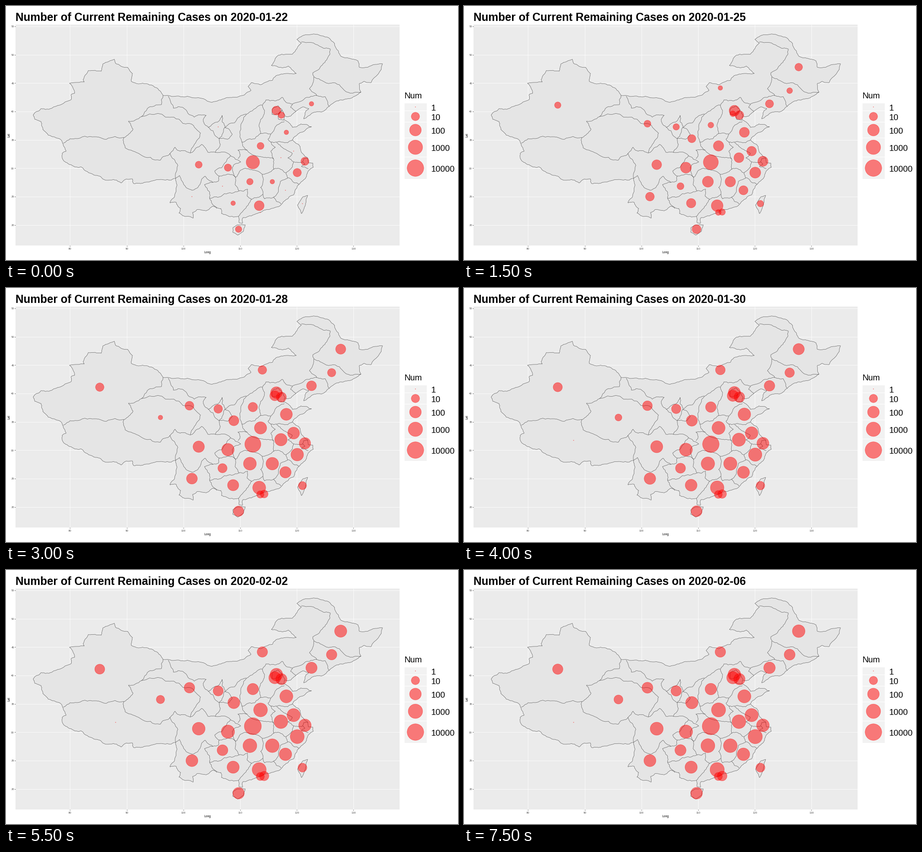
A matplotlib script that plays this animation: 998 px wide and 561 px high, repeating every 8 s.

```python
import numpy as np
import matplotlib.pyplot as plt
from matplotlib.animation import FuncAnimation
from matplotlib.patches import Rectangle

W, H, DPI = 998, 561, 72
DAYS, STEP = 16, 500
plt.rcParams["font.family"] = "Liberation Sans"
rng = np.random.default_rng(7)

# Key points (longitude, latitude) of the outer boundary, clockwise from the west.
NORTH = [
    (73.5, 39.4), (73.8, 39.8), (74.9, 40.5), (76.3, 40.4), (78.1, 41.1),
    (80.2, 42.1), (80.2, 43), (80.8, 43.2), (80.4, 44.4), (79.9, 45), (82.5, 45.2),
    (82.3, 45.6), (83.2, 47.2), (85.5, 47.1), (85.8, 48.4), (87.8, 49.2),
    (88, 48.5), (90.1, 47.8), (91, 46.7), (90.8, 45.3), (93.5, 44.9), (95.4, 44.1),
    (96.4, 42.8), (99.5, 42.6), (101.8, 42.4), (105, 41.6), (107.5, 42.4),
    (109.4, 42.5), (111.9, 43.7), (111.4, 44.4), (112, 45.1), (113.6, 44.7),
    (115.7, 45.5), (116.3, 46.3), (118.3, 46.7), (119.9, 46.7)]
NORTH_EAST = [
    (119.9, 46.7), (118.5, 48), (117.4, 47.7), (115.5, 48.1), (116.2, 49.4),
    (116.7, 49.9), (119.2, 50.1), (120.8, 52.1), (120, 52.7), (120.9, 53.3),
    (123.6, 53.6), (125.6, 53), (127.3, 50.7), (127.8, 49.7), (129.5, 49.3),
    (130.8, 48.9), (131, 47.8), (132.5, 47.8), (135.1, 48.4), (133.1, 45.1),
    (131.8, 45.3), (131, 44.9), (131.3, 43.4), (130.2, 42.7), (128.1, 42),
    (126.9, 41.8), (125.7, 40.9), (124.3, 39.9)]
COAST = [
    (124.3, 39.9), (121.2, 38.7), (122.1, 40.5), (121, 40.8), (119.8, 40),
    (118.9, 39.2), (117.8, 39.2), (117.7, 38.5), (118.9, 37.7), (119.2, 37.2),
    (120.7, 37.8), (122.6, 37.3), (120.3, 36.1), (119.2, 35), (120.3, 34.2),
    (121, 32.6), (121.9, 31.8), (122, 31), (122.8, 30.9), (122.9, 30.2),
    (122, 29.5), (121.6, 28.4), (120.4, 27.2), (119.7, 26.2), (119.5, 25.4),
    (118.1, 24.5), (116.7, 23.2), (114.8, 22.7), (113.5, 22.2), (111.8, 21.6),
    (110.5, 21.3), (110.4, 20.3), (109.8, 20.4), (109.7, 21.5)]
SOUTH_WEST = [
    (109.7, 21.5), (108, 21.5), (106.7, 22), (106.6, 22.9), (105.3, 23.3),
    (104, 22.5), (102.4, 22.7), (101.6, 22.2), (101.7, 21.2), (100.2, 21.5),
    (99.2, 22.1), (99.5, 22.9), (98.7, 24), (97.6, 23.9), (98.7, 25.9),
    (98.6, 28.2), (97.1, 28), (95.3, 28), (92.4, 27.3), (91.2, 27.3), (91, 28.1),
    (90, 28.1), (89, 27.4), (88.2, 27.9), (86, 28), (84.2, 28.8), (82, 30.2),
    (80.2, 30.6), (78.8, 31.4), (78.6, 32.6), (79.3, 33), (78.8, 34.2),
    (78.1, 35.2), (76.2, 35.8), (75.2, 36.8), (74.9, 38.2), (73.8, 38.6),
    (73.5, 39.4)]
ISLANDS = [
    [(108.7, 19.5), (109.5, 20), (110.9, 20), (110.5, 18.8), (109.6, 18.2),
     (108.7, 18.7), (108.7, 19.5)],
    [(121.9, 25.2), (121, 24.9), (120.1, 23.5), (120.8, 22), (121.5, 23.5),
     (121.9, 25.2)]]

# Key points of the borders inside, by region.
PLATEAU = [
    [(96.4, 42.8), (96.1, 41.2), (93.6, 40.5), (92.6, 39.1), (90.3, 38.3),
     (91.1, 36.9), (89.5, 35.4)],
    [(78.8, 34.4), (80, 35.2), (83.5, 35.6), (86.4, 35.1), (89.5, 35.4)],
    [(89.5, 35.4), (89.7, 33.6), (92.4, 32.4), (95.9, 31.4), (97.6, 32.6)],
    [(92.6, 39.1), (98.3, 39), (101.8, 37.5), (103, 36.2), (101.9, 34.2),
     (101.2, 32.7)],
    [(101.2, 32.7), (99.4, 33), (98.5, 33.7), (97.6, 32.6)],
    [(97.6, 32.6), (99, 30.5), (98.6, 28.2)],
    [(97.3, 42.7), (98.2, 40.6), (99.9, 40.7), (101.9, 39), (104, 39.3),
     (103.5, 38.2), (104.4, 37.2)],
    [(106.8, 39.3), (105.8, 38.1), (104.4, 37.2), (105.2, 36.6), (106.3, 35.2),
     (107.3, 37.2), (106.8, 38.2), (106.8, 39.3)],
    [(105.6, 32.8), (106.5, 34.2), (106.3, 35.2), (107.7, 35.1), (108.6, 36),
     (107.3, 37.2)],
    [(108.3, 32.2), (105.6, 32.8), (104.3, 32.8), (103.2, 34.2), (101.2, 32.7)]]
SOUTH = [
    [(98.6, 28.2), (99.3, 28.7), (100, 27.2), (101.5, 26.1), (102.9, 27.1),
     (103.8, 28.6), (105.2, 27.5)],
    [(106.3, 28.6), (106.2, 27.8), (105.2, 27.5), (103.7, 27.1), (104.6, 25.8),
     (104.6, 24.7), (105.9, 22.9)],
    [(104.6, 24.7), (106.2, 24.9), (107.2, 25.5), (109.8, 26), (109.1, 27.1),
     (109.2, 28.4)],
    [(109.2, 28.4), (107.2, 28.8), (106.3, 28.6), (105.5, 29.5), (107.5, 31.1),
     (108.3, 32.2)],
    [(108.3, 32.2), (110.1, 31.1), (108.6, 30.1), (109.2, 28.4), (110.9, 30),
     (113, 29.5), (113.9, 28.9)],
    [(118.4, 28.3), (119.6, 27.4), (120.4, 27.2)],
    [(118.4, 28.3), (117.1, 27.7), (115.9, 24.9), (117.2, 23.7)],
    [(115.9, 24.9), (114.3, 24.6), (114, 25.4), (113.6, 26.6), (114.1, 28),
     (113.9, 28.9)],
    [(114, 25.4), (112, 24.5), (111.2, 25.1), (111.3, 26.3), (109.8, 26)],
    [(112, 24.5), (111.4, 23.5), (110.4, 22.3), (109.7, 21.5)]]
EAST = [
    [(107.3, 37.2), (109, 38), (110.2, 39.3), (111.1, 39.5), (112.3, 40.3),
     (113.9, 41.1)],
    [(111.1, 39.5), (110.4, 38.2), (110.3, 34.6), (112.6, 35.2), (113.6, 36.1)],
    [(113.9, 41.1), (114.3, 40.2), (113.6, 38.6), (113.6, 36.1), (115.4, 36)],
    [(113.9, 41.1), (114.5, 42), (116, 41.9), (117.4, 42.5), (118.4, 41.5),
     (119.2, 41.3), (118.9, 40.7), (119.8, 40)],
    [(115.6, 40.3), (116.7, 41), (117.4, 40.3), (116.7, 39.6), (115.6, 39.5),
     (115.6, 40.3)],
    [(117.9, 39.3), (117.4, 40.2), (116.8, 39.6), (116.8, 38.6), (117.7, 38.5)],
    [(119.2, 41.3), (121.5, 42.4), (123.5, 42.8), (122.2, 44), (123, 46.1)],
    [(123, 46.1), (122.8, 46.8), (124.5, 48.2), (125.3, 49.2), (125.9, 51),
     (124, 51.5), (120.8, 52.3)],
    [(123, 46.1), (124.5, 45.4), (127.5, 44.7), (128.4, 43.7), (131.3, 43.4)],
    [(123.5, 42.8), (125, 42.6), (125.7, 40.9)]]
CENTRE = [
    [(117.8, 38.2), (116.2, 37.3), (115.4, 36), (114.9, 35.1), (115.4, 34.6)],
    [(115.4, 34.6), (117.4, 34.6), (118.4, 34.5), (119.2, 35)],
    [(115.4, 34.6), (116.2, 33.7), (115.4, 33), (115.9, 31.6), (115.9, 29.8)],
    [(115.9, 31.6), (114.2, 31.9), (111.2, 33.2), (110.3, 34.6)],
    [(111.2, 33.2), (109.6, 33.2), (110, 32.4), (109.6, 31.7)],
    [(116.4, 34.5), (117.6, 33.5), (119.2, 32.6), (118.4, 31.8), (119.4, 31.1)],
    [(119.4, 31.1), (121, 31.1), (121.2, 31.7), (121.9, 31.7)],
    [(121, 31.1), (121.4, 30.7), (120.8, 30.3), (122, 29.9)],
    [(119.4, 31.1), (119.2, 30.2), (118.1, 29.2), (118.4, 28.3)],
    [(113.9, 28.9), (115.9, 29.8), (116.6, 30), (118.1, 29.2)]]

# (first day, pace): bubbles as (x, y, first count, last count)
OUTBREAKS = {
    (0, 2.2): [
        (468.5, 267, 1, 38), (425.5, 350.5, 5, 296), (478, 398, 1, 64),
        (513.5, 493, 4, 99), (559, 441, 26, 920), (545, 345, 399, 20677),
        (643, 368, 10, 876), (660, 343, 9, 231), (562, 309, 5, 790),
        (597, 231, 14, 242), (608, 241, 4, 76), (674.5, 216, 2, 88)],
    (0, 3.3): [
        (490, 357, 6, 394), (410.5, 421, 1, 128), (501.5, 435.5, 2, 154),
        (561.5, 456, 1, 9), (617, 407, 1, 204), (654.5, 436.5, 1, 15),
        (588, 388, 2, 573), (538.5, 388, 4, 658), (635, 320.5, 1, 340),
        (607, 335, 1, 557), (619, 279, 2, 319)],
    (1, 2): [
        (207, 219, 2, 36), (405, 260, 2, 56), (503, 293, 3, 164),
        (570, 455, 2, 23), (719, 187, 1, 55), (739, 135, 2, 216)],
    (2, 3): [(545, 263, 1, 84), (593.5, 238, 1, 145), (566, 181, 1, 41)],
    (4, 2): [(341, 286, 1, 15)],
    (8, 1): [(242, 336.5, 1, 1)],
}


def lon_x(lon):
    return 141.5 + 12.52 * (lon - 80)


def lat_y(lat):
    return 45 + 12.53 * (55 - lat)


def rough(points, amp=0.14, rounds=3):
    """Project a polyline and break it into an uneven border line."""
    p = np.array([(lon_x(a), lat_y(b)) for a, b in points])
    for _ in range(rounds):
        d = np.diff(p, axis=0)
        side = np.column_stack([-d[:, 1], d[:, 0]])
        out = np.empty((2 * len(p) - 1, 2))
        out[::2] = p
        out[1::2] = p[:-1] + d / 2 + side * rng.uniform(-amp, amp, (len(d), 1))
        p = out
    return p


def areas(n):
    r = 18.3 * np.sqrt(np.log10(np.maximum(n, 1)) / 4)
    return np.where(n > 0, (2 * np.maximum(r, 0.5)) ** 2, 0)


def cases_on(day):
    """Geometric growth that slows down towards the last day."""
    t = np.clip((day - start) / (DAYS - 1 - start), 0, 1)
    n = first * (last / first) ** (1 - (1 - t) ** pace)
    return np.where(day >= start, np.round(n), 0)


def date_on(day):
    d = 22 + day
    return f"2020-01-{d:02d}" if d <= 31 else f"2020-02-{d - 31:02d}"


fig = plt.figure(figsize=(W / DPI, H / DPI), dpi=DPI, facecolor="white")
ax = fig.add_axes([0, 0, 1, 1])
ax.set(xlim=(0, W), ylim=(H, 0))
ax.axis("off")


def box(x0, y0, x1, y1, color):
    ax.add_patch(Rectangle((x0, y0), x1 - x0, y1 - y0, fc=color, lw=0, zorder=0))


def line(x, y, color, lw, z):
    ax.plot(x, y, color=color, lw=lw, zorder=z, solid_capstyle="butt")


def label(x, y, s, size, **kw):
    return ax.text(x, y, s, fontsize=size, **{"va": "baseline", **kw})


def bubbles(x, y, sizes):
    red = (1, 0, 0, 0.5)
    return ax.scatter(x, y, s=sizes, fc=[red], ec=[red], lw=0.7, zorder=5)


# Panel, grid and axes
box(21, 41, 869.5, 528.5, "#ebebeb")
for lon in range(80, 131, 10):
    x = lon_x(lon)
    line([x, x], [41, 528.5], "white", 0.8, 1)
    line([x, x], [528.5, 531], "#333333", 0.8, 1)
    label(x, 537.5, str(lon), 6, color="#4d4d4d", ha="center")
for lat in range(20, 56, 5):
    y = lat_y(lat)
    line([21, 869.5], [y, y], "white", 0.8, 1)
    line([18.7, 21], [y, y], "#333333", 0.8, 1)
    label(18, y + 2.3, str(lat), 6, color="#4d4d4d", ha="right")
label(445.5, 546, "Long", 6.8, ha="center")
label(7, 285, "Lat", 6.8, ha="center", va="center", rotation=90)

# Map
INK, THIN = "#333333", 0.55
mainland = np.vstack([rough(NORTH, 0.09), rough(NORTH_EAST, 0.1),
                      rough(COAST), rough(SOUTH_WEST, 0.12)])
for shape in [mainland] + [rough(p, 0.08) for p in ISLANDS]:
    ax.fill(*shape.T, fc="#e5e5e5", ec=INK, lw=THIN, zorder=2)
for border in PLATEAU + SOUTH + EAST + CENTRE:
    line(*rough(border).T, INK, THIN, 3)

# Legend
label(880, 204, "Num", 18.6)
edges = [215, 232, 256.5, 291.5, 333.5, 383]
key_y = [223, 244, 274, 312, 358]
for i, y in enumerate(key_y):
    box(880, edges[i], 929, edges[i + 1] - 0.6, "#f2f2f2")
    label(939, y + 7.6, str(10 ** i), 18.7)
bubbles([904] * 5, key_y, areas(10 ** np.arange(5)))

rows = [(*key, *row) for key, group in OUTBREAKS.items() for row in group]
start, pace, cx, cy, first, last = np.array(rows, float).T
dots = bubbles(cx, cy, areas(cases_on(0)))
title = label(21, 33, "", 24.6, weight="bold")


def update(day):
    dots.set_sizes(areas(cases_on(day)))
    title.set_text(f"Number of Current Remaining Cases on {date_on(day)}")
    return dots, title


anim = FuncAnimation(fig, update, frames=DAYS, interval=STEP, repeat=True,
                     repeat_delay=0)
plt.show()
```
